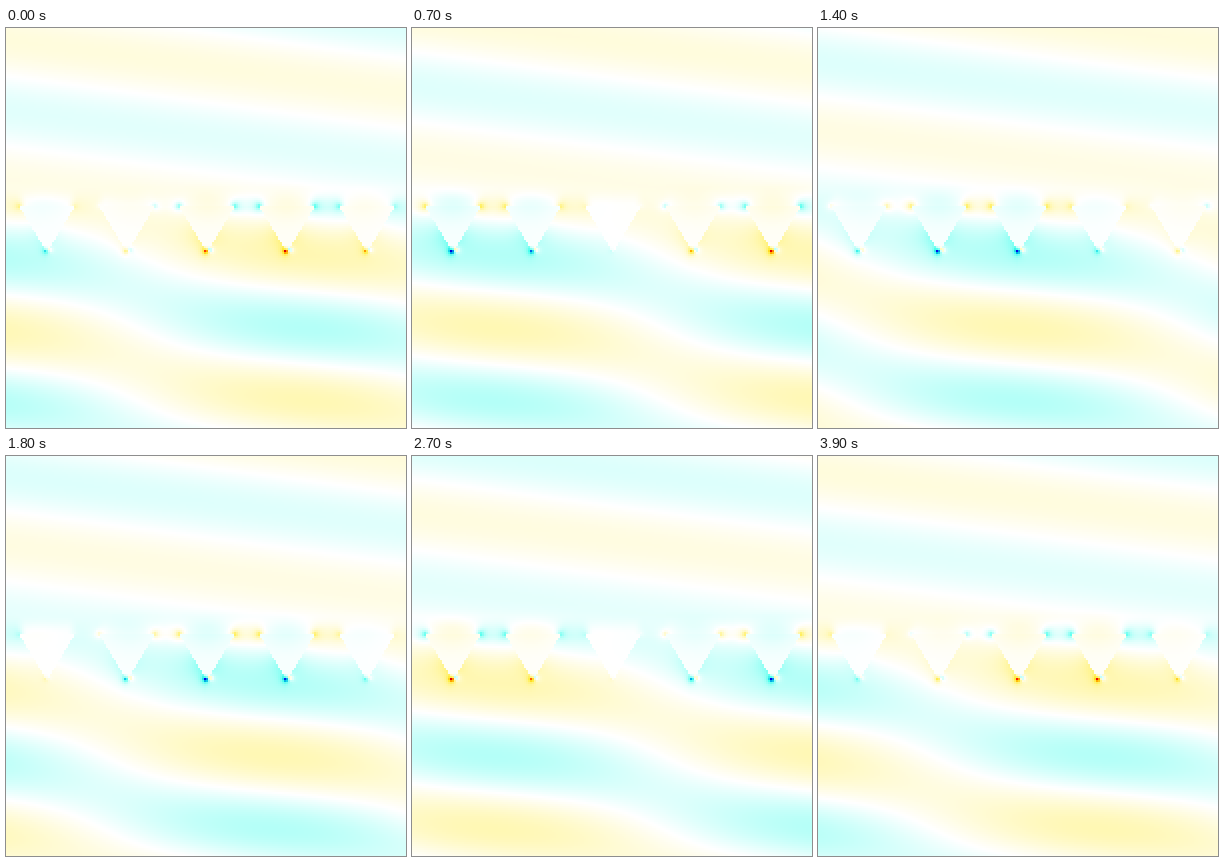
Write an HTML page with a canvas that moves like this. It is 400x400 px and loops after 4000 ms.

```html
<!DOCTYPE html>
<html>
<head>
<meta charset="utf-8">
<style>
  html, body { margin: 0; overflow: hidden; background: #fff; }
  canvas { display: block; width: 400px; height: 400px; image-rendering: pixelated; }
</style>
</head>
<body>
<canvas id="view" width="200" height="200"></canvas>
<script>
const N = 200, CELL = 2, PERIOD = 4000, STEP = 100, TAU = 2 * Math.PI;
const cones = [41, 121, 201, 281, 361];
const TIP = 225, RIM = 178, HALF = 28;

const ctx = document.getElementById('view').getContext('2d');
const image = ctx.createImageData(N, N);

const smooth = (a, b, v) => {
  const s = Math.min(1, Math.max(0, (v - a) / (b - a)));
  return s * s * (3 - 2 * s);
};
const blob = (dx, dy, rx, ry = rx) => Math.exp(-((dx / rx) ** 2) - (dy / ry) ** 2);
const spike = (dx, dy, r) => Math.exp(-Math.hypot(dx, dy) / r);

// Wave passing upward beyond the row of cones
const transmitted = (x, y, wt) =>
  (0.14 - y / 3750) * Math.cos(wt + TAU * ((y - 13) / 140 - x / 1060));

// Phase of the wave running along the row
const rowPhase = (x, wt) => wt - TAU * (x + 38) / 680;
const conePhase = (x, wt) => rowPhase(x + 45, wt);

// Incoming plus reflected wave below the row
function standing(x, y, wt) {
  const p = rowPhase(x, wt), u = Math.PI * (y - 300) / 73;
  return 0.21 * (Math.cos(p + u) + 0.4 * Math.cos(p - u));
}

const halfWidth = y => HALF * (TIP - y) / (TIP - RIM);
const inCone = (dx, y) => y >= RIM && y < TIP && Math.abs(dx) < halfWidth(y);

// How much of the outer field a cone shuts out: sharp sides, soft open top
function cover(dx, y) {
  if (y >= RIM) return inCone(dx, y) ? 0.95 : 0;
  return 0.95 * smooth(158, RIM, y) * (1 - smooth(20, 32, Math.abs(dx)));
}

// Local field around one cone, in units of the row wave
function nearField(dx, y) {
  const ax = Math.abs(dx), inside = inCone(dx, y);
  const halo = 0.13 * blob(dx, y - 172, 26, y < 172 ? 10 : 20);
  const tip = 2.4 * spike(dx + 1, y - 223, 2) - 1.3 * spike(dx - 3, y - 222, 2.2);
  if (inside) return halo + 0.02 + (y > 218 ? tip : 0);
  const corner = -0.75 * spike(ax - HALF, y - RIM, 2.6) - 0.05 * blob(ax - HALF - 5, y - RIM, 8);
  if (y < RIM) return halo + corner;
  const gap = ax - Math.max(0, halfWidth(y));
  const flank = (dx < 0 ? 0.24 : 0.14) * Math.exp(-gap / 9) * blob(0, y - 214, 1, 15);
  return corner + flank + tip;
}

function field(x, y, wt) {
  const below = smooth(158, 184, y);
  let v = transmitted(x, y, wt) * (1 - below) + standing(x, y, wt) * below;
  for (const c of cones) v *= 1 - cover(x - c, y);
  for (const c of cones) {
    const dx = x - c;
    if (Math.abs(dx) < 75 && y > 120 && y < 280)
      v -= Math.cos(conePhase(c + dx * 0.6, wt)) * nearField(dx, y);
  }
  return v;
}

// White to yellow, red, black for positive; white to cyan, blue, black for negative
function paint(i, v) {
  const a = Math.abs(v), px = image.data;
  const fade = 255 * (1 - a), tint = 255 * (1 - 0.1 * Math.min(a, 1));
  const middle = 255 * (1.7 - a), last = 255 * (2.6 - a);
  px[i] = v > 0 ? last : fade;
  px[i + 1] = v > 0 ? Math.min(tint, middle) : middle;
  px[i + 2] = v > 0 ? fade : Math.min(tint, last);
  px[i + 3] = 255;
}

// Every point oscillates harmonically, so two snapshots a quarter turn apart suffice
const cosPart = new Float32Array(N * N), sinPart = new Float32Array(N * N);
for (let i = 0; i < N * N; i++) {
  const x = (i % N + 0.5) * CELL, y = (Math.floor(i / N) + 0.5) * CELL;
  cosPart[i] = field(x, y, 0);
  sinPart[i] = field(x, y, TAU / 4);
}

let shown = -1;
function draw() {
  const step = Math.floor(performance.now() % PERIOD / STEP);
  if (step !== shown) {
    shown = step;
    const wt = TAU * step * STEP / PERIOD, c = Math.cos(wt), s = Math.sin(wt);
    for (let i = 0; i < N * N; i++) paint(i * 4, cosPart[i] * c + sinPart[i] * s);
    ctx.putImageData(image, 0, 0);
  }
  requestAnimationFrame(draw);
}
draw();
</script>
</body>
</html>
```
